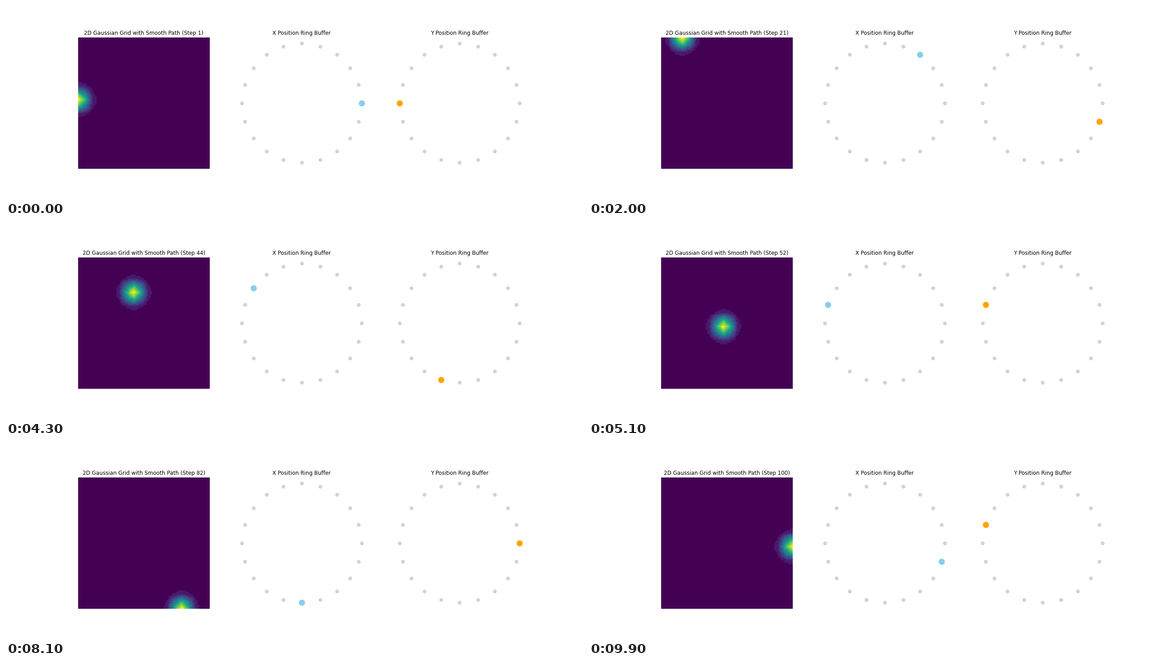
Write a matplotlib script that moves like this. It is 1280 px wide and 427 px high and loops after 10 s.

```python
import numpy as np
import matplotlib as mpl
import matplotlib.pyplot as plt
from matplotlib.animation import FuncAnimation

STEPS = 100    # frames in one loop
CELLS = 20     # coarse grid cells and ring slots
FINE = 100     # samples per side of the displayed grid
DPI = 64
K = (1280 / 18) / DPI    # point sizes are laid out for an 18 inch wide figure

plt.rcParams["font.family"] = "DejaVu Sans"

nodes = np.arange(CELLS)
samples = np.linspace(0, CELLS - 1, FINE)
angles = 2 * np.pi * nodes / CELLS
ring = np.column_stack([np.cos(angles), np.sin(angles)])

# Path across the grid: steady in x, one sine wave in y, snapped to cells.
t = np.linspace(0, 2 * np.pi, STEPS)
path_x = np.linspace(0, CELLS - 1, STEPS).astype(int)
path_y = np.clip(10 + 10 * np.sin(t), 0, CELLS - 1).astype(int)


def profile(center):
    """Unit Gaussian on the coarse nodes, linearly refined."""
    return np.interp(samples, nodes, np.exp(-(nodes - center) ** 2 / 2))


def bump(step):
    field = np.outer(profile(path_y[step]), profile(path_x[step]))
    return field / field.max()


def add_title(ax, text):
    return ax.set_title(text, fontsize=12 * K, pad=6 * K)


def add_ring(ax, title, color):
    """Draw the grey slots and return the highlighted marker."""
    add_title(ax, title)
    ax.set(xlim=(-1.1, 1.1), ylim=(-1.1, 1.1), aspect="equal")
    ax.axis("off")
    ax.scatter(*ring.T, s=50 * K**2, c="lightgray", linewidths=1.5 * K)
    return ax.scatter([0], [0], s=150 * K**2, c=color,
                      linewidths=1.5 * K, zorder=3)


fig, (ax_grid, ax_x, ax_y) = plt.subplots(
    1, 3, figsize=(1280 / DPI, 427 / DPI), dpi=DPI, facecolor="white")
fig.subplots_adjust(left=0.125, right=0.9, bottom=0.11, top=0.88, wspace=0.2)

image = ax_grid.imshow(bump(0), origin="lower", vmin=0, vmax=1,
                       cmap=mpl.colormaps["viridis"].resampled(16),
                       interpolation="nearest")
ax_grid.axis("off")
grid_title = add_title(ax_grid, "")
dot_x = add_ring(ax_x, "X Position Ring Buffer", "skyblue")
dot_y = add_ring(ax_y, "Y Position Ring Buffer", "orange")


def update(step):
    image.set_data(bump(step))
    grid_title.set_text(f"2D Gaussian Grid with Smooth Path (Step {step + 1})")
    dot_x.set_offsets(ring[path_x[step]])
    dot_y.set_offsets(ring[path_y[step]])
    return image, grid_title, dot_x, dot_y


anim = FuncAnimation(fig, update, frames=STEPS, interval=100,
                     init_func=lambda: update(0), repeat=True, repeat_delay=0)
plt.show()
```
